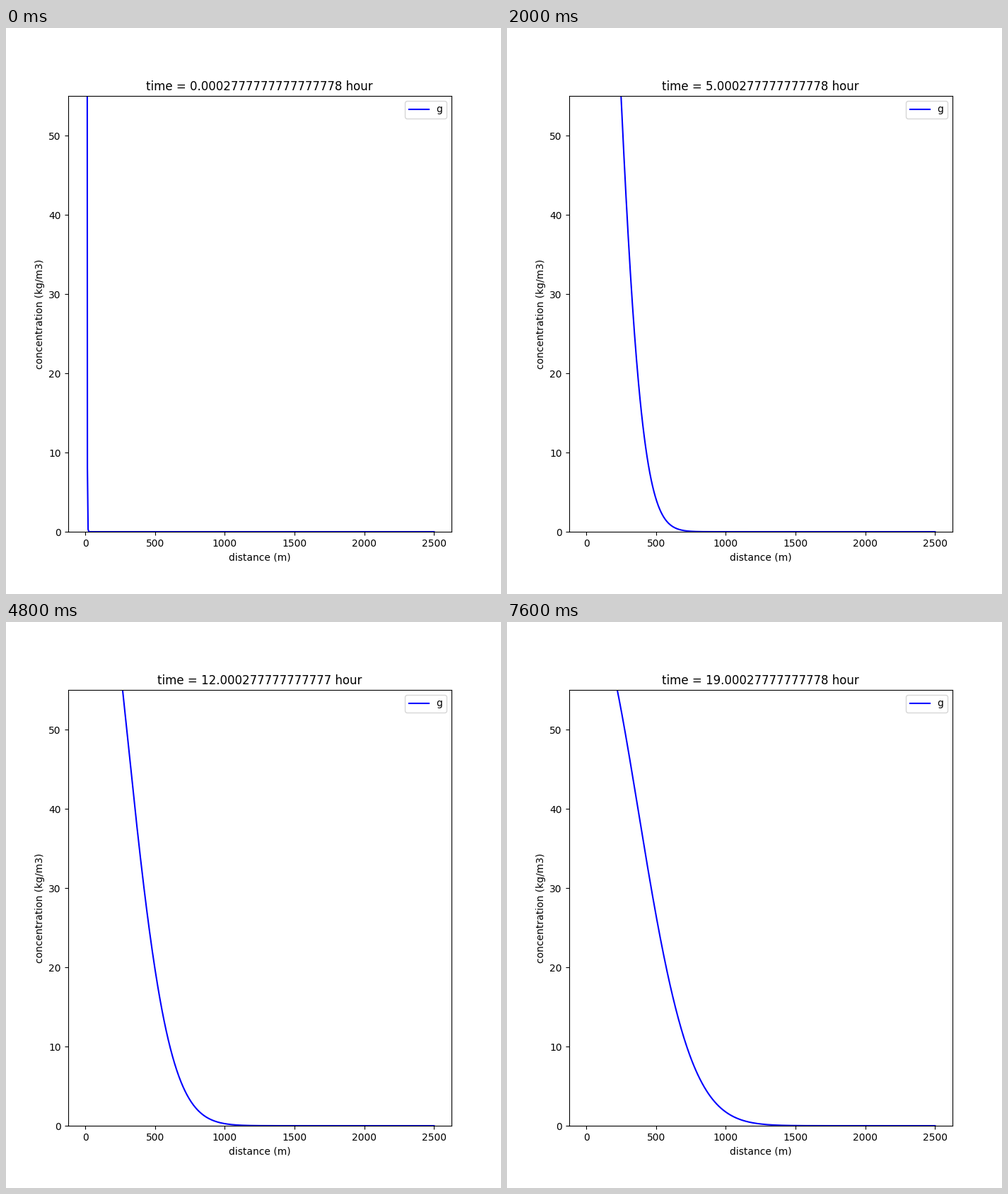
These frames come from a looping animation (700x800 px, 8000 ms). A matplotlib script:

```python
import numpy as np
import matplotlib.pyplot as plt
from matplotlib.animation import FuncAnimation

FRAMES = 20
INTERVAL = 400      # ms, one simulated hour per frame
DX = 5.0            # m
DT = 1.0            # s
DIFFUSIVITY = 1.0   # m2/s
START = 6080.0      # kg/m3 released in the first cell
CELLS = 500

# Cosine modes of implicit diffusion between two closed walls
modes = np.arange(1, CELLS)
cells = np.arange(CELLS)
shapes = np.cos(np.pi * np.outer(cells + 0.5, modes) / CELLS)
eigenvalues = 4 * np.sin(np.pi * modes / (2 * CELLS)) ** 2
damping = 1 / (1 + DIFFUSIVITY * DT / DX**2 * eigenvalues)
distance = np.arange(CELLS + 1) * DX


def concentration(steps):
    inner = START / CELLS * (1 + 2 * shapes @ (shapes[0] * damping**steps))
    return np.concatenate(([inner[0]], inner))


def title(hour):
    value = hour + 1 / 3600
    digits = f"{value:.14f}" if hour >= 16 else repr(value)
    return f"time = {digits} hour"


fig, ax = plt.subplots(figsize=(7, 8), dpi=100)
line, = ax.plot([], [], color="blue", label="g")
ax.set_xlim(-125, 2625)
ax.set_ylim(0, 55)
ax.set_xlabel("distance (m)")
ax.set_ylabel("concentration (kg/m3)")
ax.legend(loc="upper right")


def update(hour):
    line.set_data(distance, concentration(3600 * hour + 1))
    ax.set_title(title(hour))
    return line,


anim = FuncAnimation(fig, update, frames=FRAMES, interval=INTERVAL,
                     repeat=True, repeat_delay=0, blit=False)
plt.show()
```
